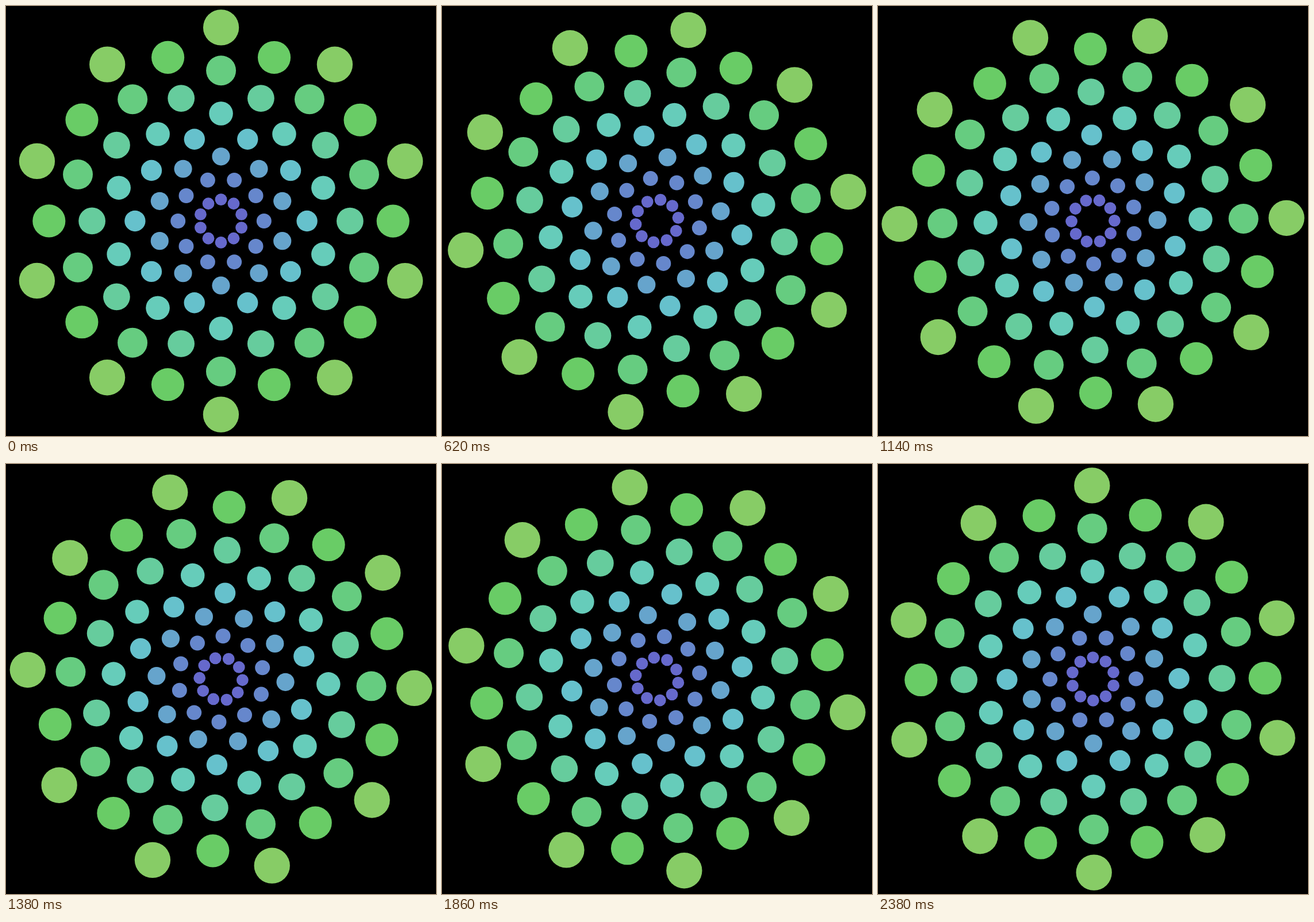
Recreate the animation shown at these times as an HTML page with a canvas. Size 748 px wide and 748 px high, loop 2400 ms.

```html
<!DOCTYPE html>
<html lang="en">
<head>
<meta charset="utf-8">
<title>Rotating rings of dots</title>
<style>
  html, body { margin: 0; width: 100%; height: 100%; overflow: hidden; background: #000; }
  canvas { display: block; }
</style>
</head>
<body>
<canvas id="stage" width="748" height="748"></canvas>
<script>
const SIZE = 748, RINGS = 9, DOTS = 10, LOOP = 2400;
const STEP = 2 * Math.PI / DOTS;
const ctx = document.getElementById('stage').getContext('2d');

function drawRing(ring, turn) {
  const distance = ring * SIZE / 20;
  const radius = (ring + 3) * SIZE / 288;
  const offset = ring % 2 ? 0 : STEP / 2;
  ctx.fillStyle = `hsl(${238 - 17.15 * (ring - 1)}, 50%, 60%)`;
  for (let i = 0; i < DOTS; i++) {
    const angle = i * STEP + offset + turn;
    ctx.beginPath();
    ctx.arc(SIZE / 2 + distance * Math.sin(angle),
            SIZE / 2 - distance * Math.cos(angle), radius, 0, 2 * Math.PI);
    ctx.fill();
  }
}

// One loop turns the figure by exactly one dot spacing.
function draw(now) {
  const turn = STEP * (now % LOOP) / LOOP;
  ctx.fillStyle = '#000';
  ctx.fillRect(0, 0, SIZE, SIZE);
  for (let ring = 1; ring <= RINGS; ring++) drawRing(ring, turn);
  requestAnimationFrame(draw);
}
requestAnimationFrame(draw);
</script>
</body>
</html>
```
